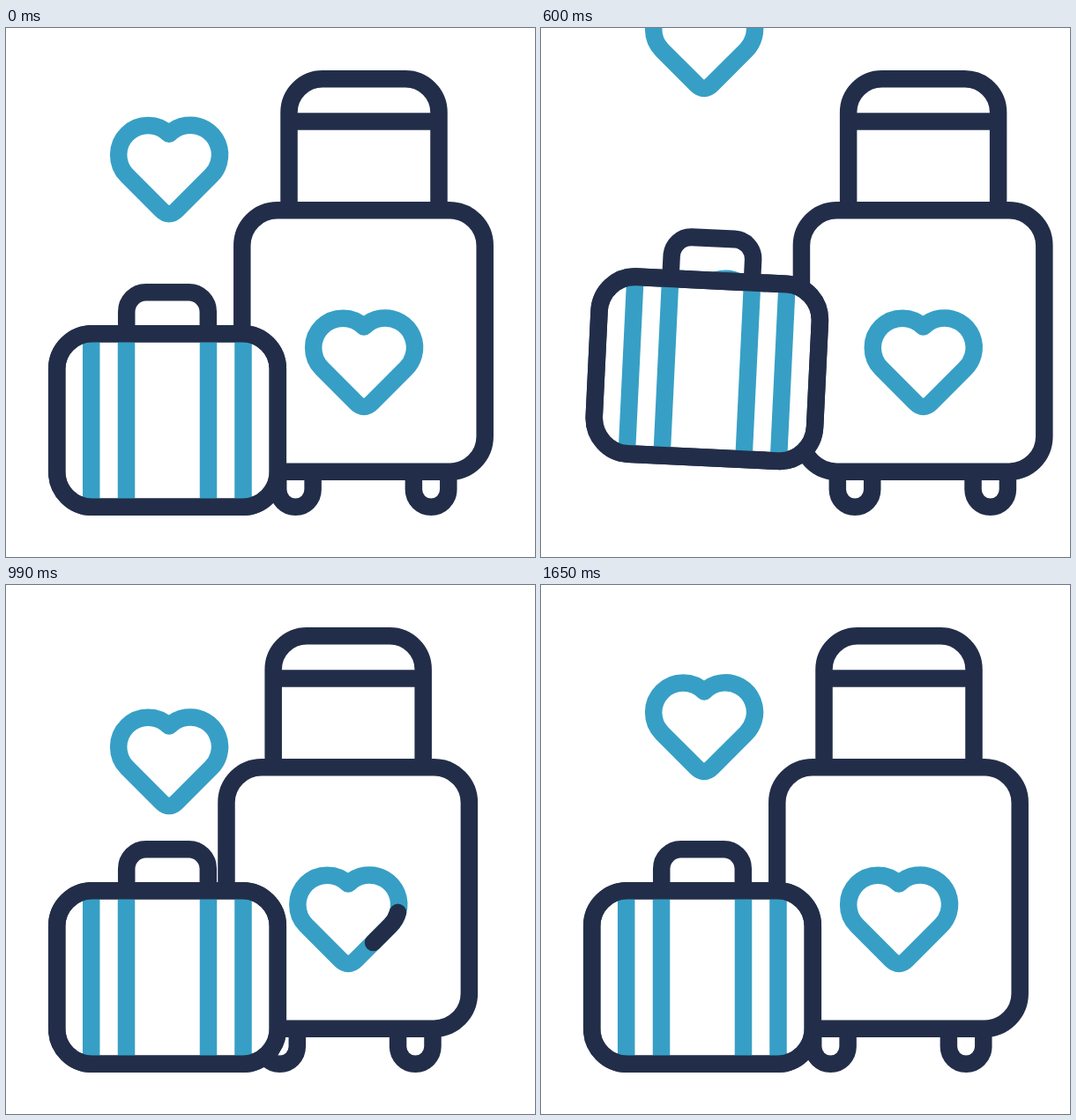
Animation, 600 px wide and 600 px high, one loop 1680 ms. Source, as an HTML page:

```html
<!DOCTYPE html>
<html lang="en">
<head>
<meta charset="utf-8">
<title>Luggage</title>
<style>
  html, body { margin: 0; width: 100%; height: 100%; overflow: hidden; background: #fff; }
  svg { display: block; width: 100vw; height: 100vh; }
  .navy { stroke: #222e49; }
  .blue { stroke: #379fc5; }
</style>
</head>
<body>
<svg viewBox="0 0 600 600" fill="none" stroke-width="19.5" stroke-linejoin="round">
  <defs>
    <path id="heart" pathLength="1" d="M241.3 153A33.5 33.5 0 0 1 232.7 167.7L193.8 206.6Q185 215.4 176.2 206.6L137.3 167.7A33.5 33.5 0 0 1 185 120.6A33.5 33.5 0 0 1 241.3 153Z"/>
    <path id="wheel" d="M308.7 503V523.6a19.7 19.7 0 0 0 39.4 0V503"/>
  </defs>
  <use id="leaving" href="#heart" class="blue"/>
  <use id="rising" href="#heart" class="blue"/>

  <g id="trolley" class="navy">
    <path d="M321 206V95.7a38 38 0 0 1 38 -38H453a38 38 0 0 1 38 38V206M321 106H491"/>
    <use href="#wheel"/>
    <use href="#wheel" x="153.7"/>
    <rect x="267.8" y="206.8" width="275.4" height="296.4" rx="40" fill="#fff"/>
    <g transform="translate(221 218.5)">
      <use href="#heart" class="blue"/>
      <path id="trace" stroke-linecap="round"/>
    </g>
  </g>

  <g id="bag" class="navy">
    <path d="M136.7 346V321.8a22 22 0 0 1 22 -22H207.3a22 22 0 0 1 22 22V346"/>
    <rect x="57.7" y="346.8" width="250.6" height="196.5" rx="40" fill="#fff"/>
    <path class="blue" d="M96.7 352V538M136.5 352V538M229.5 352V538M269 352V538"/>
    <rect x="57.7" y="346.8" width="250.6" height="196.5" rx="40"/>
  </g>
</svg>
<script>
const LOOP = 1680;
const $ = id => document.getElementById(id);
const leaving = $('leaving'), rising = $('rising');
const trolley = $('trolley'), bag = $('bag'), trace = $('trace');
const heart = $('heart');
trace.setAttribute('d', heart.getAttribute('d'));
const total = trace.getTotalLength();

// Eased value between [time, value] keys
function track(t, keys) {
  if (t <= keys[0][0]) return keys[0][1];
  for (let i = 1; i < keys.length; i++) {
    const [t0, a] = keys[i - 1], [t1, b] = keys[i];
    if (t < t1) {
      const x = (t - t0) / (t1 - t0);
      return a + (b - a) * x * x * (3 - 2 * x);
    }
  }
  return keys[keys.length - 1][1];
}

const slide = [[210, 0], [540, 35], [855, -40.2], [1170, 16], [1485, 0]];
const jump = [[209, 0], [500, -61], [535, -61], [912, 0]];
const squash = [[0, 1], [210, 0.915], [540, 1.025], [850, 1]];
const head = [[880, 0], [1370, 1]];
const tail = [[1250, 0], [1645, 1]];

const tilt = t => t > 381 && t < 741 ? -4.3 * Math.sin(Math.PI * (t - 381) / 180) : 0;
const shift = (el, x, y) => el.setAttribute('transform', `translate(${x} ${y})`);

function draw(t) {
  shift(leaving, 0, -0.2373 * t);
  shift(rising, 0, 3.53 * (Math.exp(0.00363 * (LOOP - t)) - 1));
  rising.style.display = t >= 600 ? '' : 'none';

  shift(trolley, track(t, slide), 0);

  const a = track(t, tail) * total, b = track(t, head) * total;
  trace.style.display = b - a > 0.5 ? '' : 'none';
  trace.setAttribute('stroke-dasharray', `0 ${a} ${b - a} ${total * 2}`);

  // The bag turns and squashes about the middle of its base
  bag.setAttribute('transform',
    `translate(183 ${553 + track(t, jump)}) rotate(${tilt(t)}) scale(1 ${track(t, squash)}) translate(-183 -553)`);
}

const start = performance.now();
function tick() {
  draw((performance.now() - start) % LOOP);
  requestAnimationFrame(tick);
}
tick();
</script>
</body>
</html>
```
